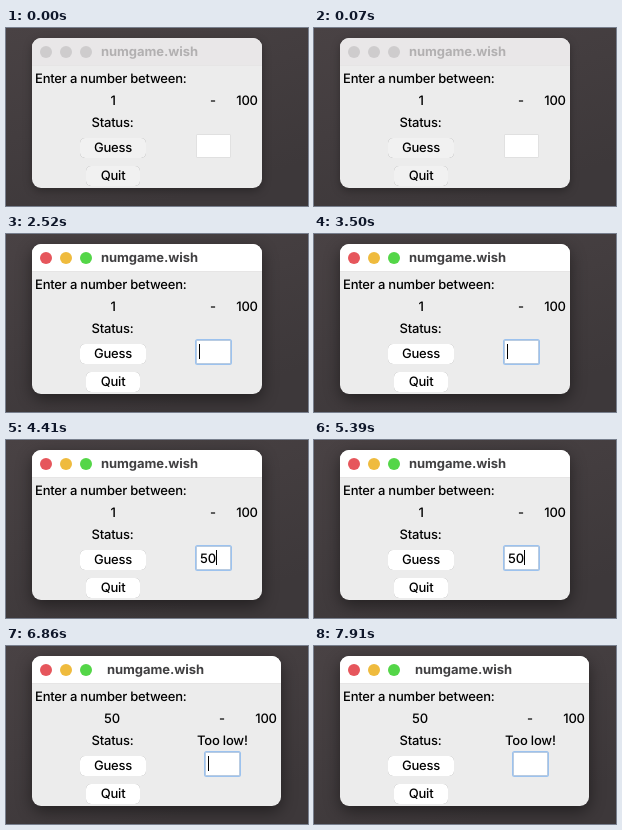
An HTML page for the animation above (8 s loop, 302 by 178 pixels).

```html
<!DOCTYPE html>
<html lang="en">
<head>
<meta charset="utf-8">
<title>Number game</title>
<style>
  html, body { margin: 0; width: 100%; height: 100%; overflow: hidden; background: #433d3f; }
  svg { display: block; width: 302px; height: 178px; }
  text { font: 500 13px Inter, "Open Sans", sans-serif; letter-spacing: -.2px; fill: #000; text-rendering: geometricPrecision; }
  .mid { text-anchor: middle; }
  #title { font-weight: 700; letter-spacing: -.05px; fill: #414042; }
  #frame { filter: drop-shadow(0 5px 8px rgba(0, 0, 0, .45)); }
  .button rect { fill: #fff; filter: drop-shadow(0 .6px .6px rgba(0, 0, 0, .4)); }
  .unfocused .button rect { fill: #f1f1f1; }
  .inactive #title { fill: #b2b0b1; }
  .inactive #bar { fill: #e9e7e8; }
  .inactive #lights circle { fill: #cecccd; }
  .inactive #frame { filter: drop-shadow(0 3px 4px rgba(0, 0, 0, .3)); }
</style>
</head>
<body>
<svg id="stage" viewBox="0 0 302 178">
  <defs>
    <linearGradient id="desk" x2=".5" y2="1">
      <stop stop-color="#494244"/>
      <stop offset="1" stop-color="#3d383a"/>
    </linearGradient>
    <clipPath id="corners"><rect class="window" x="26" y="10" height="150" rx="9"/></clipPath>
  </defs>
  <rect width="302" height="178" fill="url(#desk)"/>
  <g id="frame"><rect class="window" x="26" y="10" height="150" rx="9" fill="#ececec"/></g>
  <g clip-path="url(#corners)">
    <rect id="bar" class="window" x="26" y="10" height="27" fill="#fff"/>
    <rect class="window" x="26" y="37" height="1" fill="#e6e5e5"/>
  </g>
  <g id="lights">
    <circle cx="40" cy="24" r="6" fill="#e6565c"/>
    <circle cx="60" cy="24" r="6" fill="#efbb3e"/>
    <circle cx="80" cy="24" r="6" fill="#54d648"/>
  </g>
  <text id="title" class="mid" y="28">numgame.wish</text>

  <text x="29" y="55">Enter a number between:</text>
  <text id="low" class="mid" y="77"></text>
  <text id="dash" class="mid" y="77">-</text>
  <text id="high" class="mid" y="77">100</text>
  <text class="mid" x="106.5" y="99">Status:</text>
  <text id="status" x="191" y="99"></text>
  <g class="button">
    <rect x="74" y="110" width="66" height="20" rx="5"/>
    <text class="mid" x="107" y="124">Guess</text>
  </g>
  <g class="button">
    <rect x="80" y="138" width="54" height="20" rx="5"/>
    <text class="mid" x="107" y="152">Quit</text>
  </g>

  <g id="entry">
    <rect id="ring" x="-1.5" y="-1.5" width="37" height="26" rx="2.5" fill="#9cc2ee"/>
    <rect width="34" height="23" fill="#d5d5d5"/>
    <rect x=".5" y=".5" width="33" height="22" fill="#fff"/>
    <text id="typed" x="3.5" y="16.5"></text>
    <rect id="caret" y="3.5" width="1" height="15" fill="#000"/>
  </g>
</svg>
<script>
  const LOOP = 8000, ACTIVATE = 1540, FOCUS = 1610, ANSWER = 6860;
  const $ = id => document.getElementById(id);
  const place = (id, x) => $(id).setAttribute("x", x);
  const show = (id, visible) => $(id).style.display = visible ? "" : "none";

  const caretSpans = [[1610, 2240], [2520, 3150], [3500, 4130], [4410, 5040],
                      [5390, 6020], [6300, 6930], [7280, 7910]];

  function draw(t) {
    const answered = t >= ANSWER, focused = t >= FOCUS;
    const shift = answered ? 19 : 0;
    const typed = answered || t < 4060 ? "" : t < 4410 ? "5" : "50";

    $("stage").classList.toggle("inactive", t < ACTIVATE);
    $("stage").classList.toggle("unfocused", !focused);
    document.querySelectorAll(".window").forEach(r => r.setAttribute("width", 230 + shift));
    place("title", answered ? 149.5 : 143.5);
    place("low", answered ? 106 : 107);
    place("dash", answered ? 216 : 207);
    place("high", 241 + shift);
    $("low").textContent = answered ? "50" : "1";
    $("status").textContent = answered ? "Too low!" : "";

    $("entry").setAttribute("transform", `translate(${answered ? 199.5 : 190.5} 106.5)`);
    $("typed").textContent = typed;
    place("caret", 2.5 + typed.length * 8.5);
    show("ring", focused);
    show("caret", caretSpans.some(([on, off]) => t >= on && t < off));
  }

  const start = performance.now();
  function tick() {
    draw((performance.now() - start) % LOOP);
    requestAnimationFrame(tick);
  }
  tick();
</script>
</body>
</html>
```
